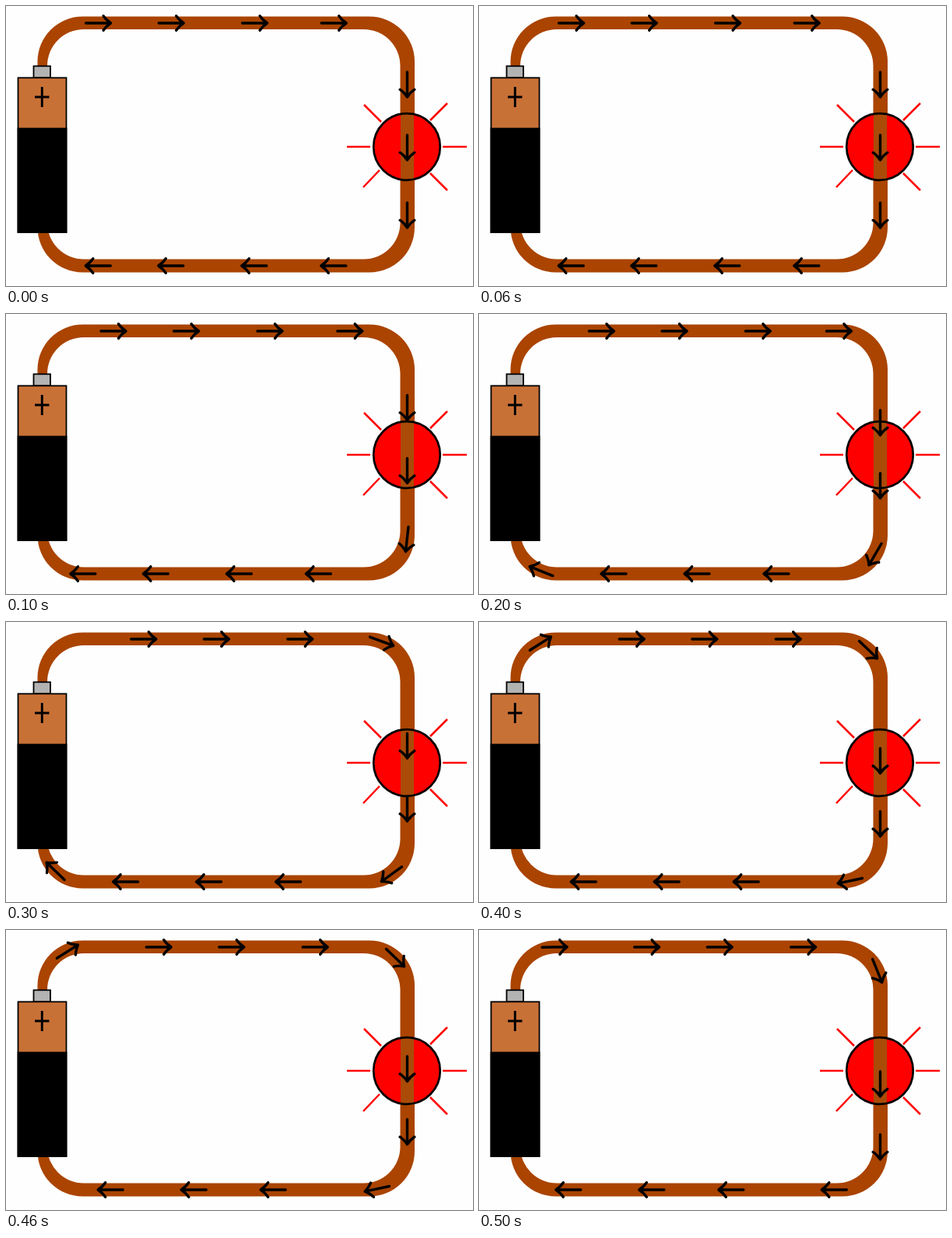
These frames come from a looping animation (600x360 px, 600 ms). An HTML page:

```html
<!DOCTYPE html>
<html lang="en">
<head>
<meta charset="utf-8">
<title>Electric circuit</title>
<style>
html, body { margin: 0; width: 100%; height: 100%; overflow: hidden; background: #fefefe; }
svg { display: block; }
</style>
</head>
<body>
<svg width="600" height="360" viewBox="0 0 600 360" fill="none" stroke="#000">
  <defs>
    <path id="arrow" d="M-16.500 0H15.500M6 -9.300Q9.500 -4 15.500 0Q9.500 4 6 9.300" stroke-width="3.400" stroke-linecap="round" stroke-linejoin="round"/>
    <path id="track" d="M78 28.300A35 35 0 0 1 98 22H466A49.500 49.500 0 0 1 515.500 71.500V284.500A49.500 49.500 0 0 1 466 334H98A50 50 0 0 1 59.700 316.100"/>
  </defs>

  <g stroke="none">
    <rect x="40.500" y="13.500" width="484.500" height="329" rx="58" fill="#aa4400"/>
    <rect x="53" y="30" width="453.500" height="295.500" rx="47" fill="#fefefe"/>
  </g>

  <g stroke-width="1.800">
    <rect x="35.500" y="77.300" width="21.500" height="15" fill="#b3b3b3"/>
    <rect x="15.500" y="92.300" width="62" height="198.700" fill="#c87137"/>
    <rect x="15.500" y="157.500" width="62" height="133.500" fill="#000"/>
  </g>
  <path d="M37 117H55.500M46.300 104V130" stroke-width="2.900"/>

  <path stroke="#f00" stroke-width="2.500" d="M438 181H468M561 181H592M460 127L482 149M567 125L545 147M459 233L480 211M567 237L545 215"/>
  <circle cx="515" cy="181" r="42.800" fill="#f00"/>
  <path d="M515.500 139V223" stroke="#aa4b08" stroke-width="17"/>
  <circle cx="515" cy="181" r="42.800" stroke-width="2.700"/>

  <g id="arrows"></g>
</svg>
<script>
const FRAME = 100, COUNT = 6;
const STEP = 19.4, TURN_STEP = 20.6;

// Arrow positions along the track at time zero
const steady = [-76, 42.4, 136, 243.4, 497, 578, 803.5, 905.5, 1012.5, 1106];
const turning = [345, 665];  // these round a right-hand corner, a little faster

const track = document.getElementById("track");
const arrows = document.getElementById("arrows");
const length = track.getTotalLength();

function arrow(d) {
  if (d < 0 || d > length) return "";
  const { x, y } = track.getPointAtLength(d);
  const a = track.getPointAtLength(d - 1), b = track.getPointAtLength(d + 1);
  const heading = Math.atan2(b.y - a.y, b.x - a.x) * 180 / Math.PI;
  return `<use href="#arrow" transform="translate(${x} ${y}) rotate(${heading})"/>`;
}

function draw(step) {
  arrows.innerHTML =
    steady.map(d => arrow(d + step * STEP)).join("") +
    turning.map(d => arrow(d + step * TURN_STEP)).join("");
}

let shown = -1;
function tick() {
  const step = Math.floor(performance.now() / FRAME) % COUNT;
  if (step !== shown) draw(shown = step);
  requestAnimationFrame(tick);
}
tick();
</script>
</body>
</html>
```
